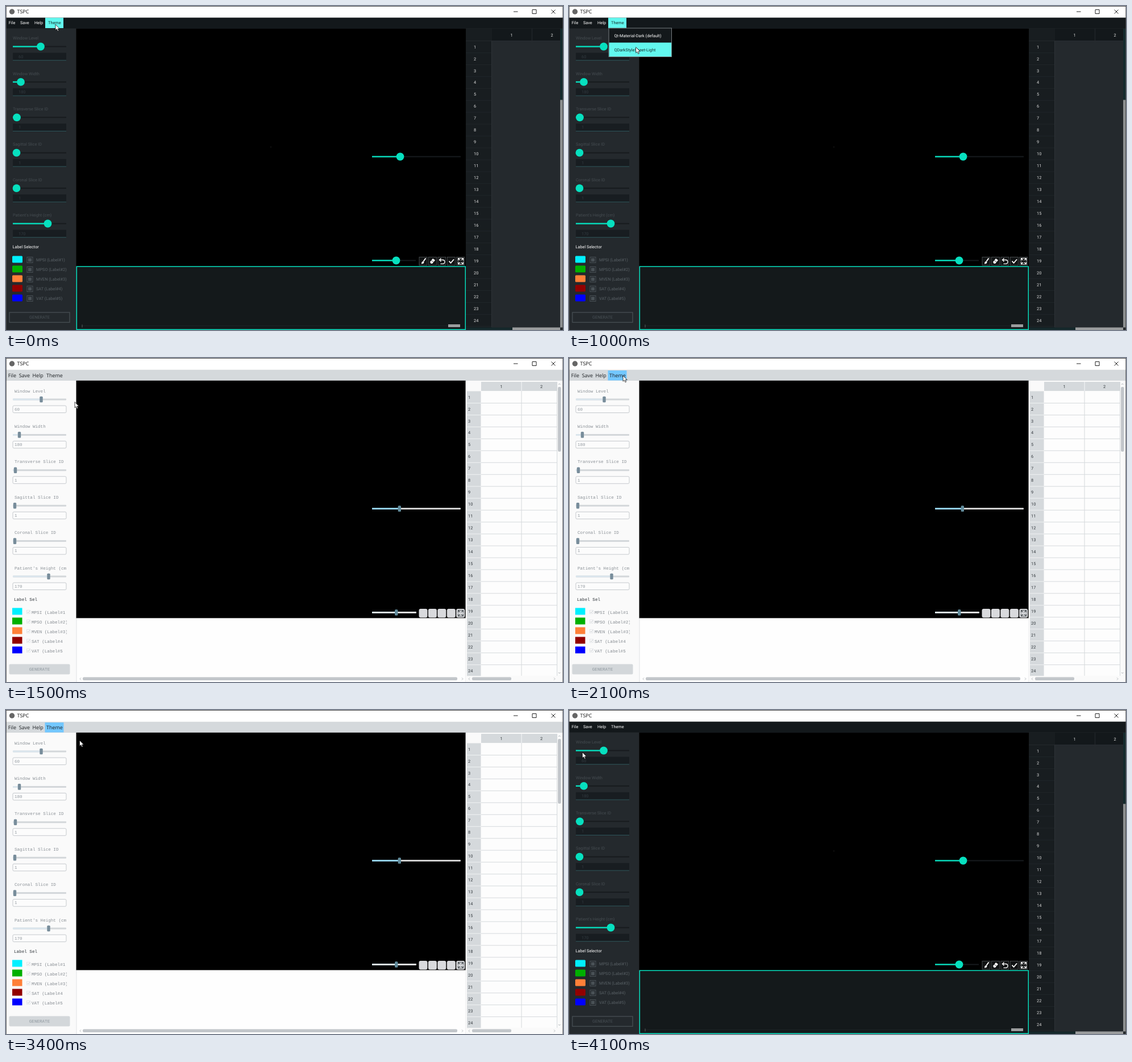
Write an HTML page that moves like this. It is 980 px wide and 571 px high and loops after 4.2 s.

```html
<!DOCTYPE html>
<html lang="en">
<head>
<meta charset="utf-8">
<title>Theme switch</title>
<style>
  html, body { margin: 0; width: 100%; height: 100%; overflow: hidden; background: #000; }
  svg { display: block; width: 980px; height: 571px; }
  text { white-space: pre; text-rendering: geometricPrecision; }
  .roboto { font: 7.35px Roboto, sans-serif; }
  .ui { font: 8.95px "Open Sans", sans-serif; }
  .mono { font: 7.6px "Liberation Mono", monospace; }
</style>
</head>
<body>
<svg id="stage" viewBox="0 0 980 571"></svg>
<script>
const LOOP = 4200, STEP = 100;
const TEAL = '#07e0bf', CYAN = '#62f7ee', BLUE = '#73c7ff';
const BAR = '#13181b', PANEL = '#24292d', SILVER = '#d5d9dc', HANDLE = '#c2c6ca';

const rect = (x, y, w, h, fill, extra = '') =>
  `<rect x="${x}" y="${y}" width="${w}" height="${h}" fill="${fill}" ${extra}/>`;
const text = (x, y, str, fill, font = 'roboto', extra = '') =>
  `<text x="${x}" y="${y}" fill="${fill}" class="${font}" ${extra}>${str}</text>`;
const path = (d, stroke, width = 1, fill = 'none') =>
  `<path d="${d}" stroke="${stroke}" stroke-width="${width}" fill="${fill}"/>`;
const circle = (x, y, r, fill) => `<circle cx="${x}" cy="${y}" r="${r}" fill="${fill}"/>`;
const group = (id, body) => `<g id="${id}">${body}</g>`;
const range = (n, draw) => Array.from({ length: n }, (_, i) => draw(i)).join('');
const MIDDLE = 'text-anchor="middle"';

const ROW = 62.4;
const fields = [
  { label: 'Window Level', value: 60, dark: 61, light: 62 },
  { label: 'Window Width', value: 180, dark: 26, light: 23.5 },
  { label: 'Transverse Slice ID', value: 1, dark: 19, light: 16.5 },
  { label: 'Sagittal Slice ID', value: 1, dark: 18.5, light: 15.5 },
  { label: 'Coronal Slice ID', value: 1, dark: 18.5, light: 15.5 },
  { label: "Patient's Height (cm)", value: 170, dark: 73.5, light: 75 },
];
const labels = [
  ['MPSI', '#00f0ff'], ['MPSO', '#00b000'], ['MVEN', '#ff8038'], ['SAT', '#920000'], ['VAT', '#0000ff'],
];
const menus = ['File', 'Save', 'Help', 'Theme'];
const toolX = [727, 743.4, 759.8, 776.3, 792.7];

const expandIcon = color => path(
  'M795.5 449v-4.500h4.500M800 444.500h4.500v4.500M804.500 450.500v4.500h-4.500M800 455h-4.500v-4.500' +
  'M796 445l3 3M804 445l-3 3M804 454.500l-3-3M796 454.500l3-3', color, 1.2);

function titleBar() {
  return rect(0, 0, 980, 20.5, '#fff') + rect(0, 0, 980, 1, '#4b4b4b') +
    circle(10.5, 10, 4.7, '#666') + text(19.5, 13.4, 'TSPC', '#111', 'ui') +
    path('M893 10h7.500M926 6.500h7v7h-7zM959.500 6.500l7 7M966.500 6.500l-7 7', '#222');
}

function darkSlider(x1, x2, y, knob) {
  return rect(x1, y - 1, x2 - x1, 2, '#171b1e') + rect(x1, y - 1.2, knob - x1, 2.4, TEAL) +
    circle(knob, y, 6.9, TEAL);
}

function darkSidebar() {
  const inputs = fields.map(({ label, value, dark }, i) => {
    const y = i * ROW;
    return text(12, 59.2 + y, label, '#454c51') + darkSlider(12, 106, 71.5 + y, dark) +
      rect(12, 82.5 + y, 94, 13, '#181d21') + rect(12, 95.2 + y, 94, 1, '#2d555a') +
      text(22, 91.6 + y, value, '#333b40');
  }).join('');
  const legend = labels.map(([name, color], i) => {
    const y = i * 17;
    return rect(11, 440.5 + y, 18, 12, color, 'rx="1.5"') +
      rect(37, 442.5 + y, 10, 10, 'none', 'stroke="#495156"') + rect(39, 444.500 + y, 6, 6, '#495156') +
      text(53, 450.2 + y, `${name} (Label#${i + 1})`, '#596166');
  }).join('');
  return inputs + text(11.5, 427, 'Label Selector', '#fff') + legend +
    rect(6, 540, 106, 17.5, 'none', 'stroke="#474f54" stroke-width="1.3"') +
    text(59, 551, 'GENERATE', '#495156', 'roboto', MIDDLE);
}

function darkTools() {
  const boxes = toolX.map(x => rect(x, 442.500, 14, 14.500, '#101213', 'stroke="#53575a" stroke-width=".8"')).join('');
  return boxes +
    path('M738.500 444.500l-4 5.500', '#fff', 2) + path('M734 450q-3 0-3 4.500q4.500 0 4.500-3.500z', 'none', 0, '#fff') +
    path('M746 451l5-6 4 3-5 6h-2.500z', 'none', 0, '#fff') + path('M748.300 448.300l4 3.200', '#101213', .8) +
    path('M763 447.500h5.500a3.400 3.400 0 0 1 0 6.800h-4M765.500 444.500l-3 3 3 3', '#fff', 1.3) +
    path('M779.500 449.700l3 3.300 5.500-6.500', '#fff', 1.8) + expandIcon('#fff');
}

function darkTable() {
  return rect(809, 40, 45.500, 531, '#181d20') + rect(854.500, 40, 120.500, 21, BAR) +
    rect(854, 61, 1, 505, '#2d3236') + rect(925, 40, 1, 21, PANEL) + rect(809, 61, 166, .7, '#2a2f33') +
    text(889.500, 53.500, 1, '#dcdcdc', 'roboto', MIDDLE) + text(960.500, 53.500, 2, '#dcdcdc', 'roboto', MIDDLE) +
    range(24, i => text(823, 74.6 + i * 20.96, i + 1, '#dcdcdc') +
      rect(809, 82 + i * 20.96, 45, .7, '#23292d')) +
    rect(975, 40, 5, 126, '#142a2d') + rect(975, 165.500, 4.500, 401, '#8d9091') +
    rect(809, 566.500, 82, 4.500, '#15282b') + rect(891, 566.500, 84, 4.500, '#9a9c9d');
}

function darkTheme() {
  return rect(0, 20, 980, 551, PANEL) + rect(0, 20, 980, 19.5, BAR) + darkSidebar() +
    rect(123.5, 39.8, 685.5, 419, '#000') + rect(465.500, 248, 1, 1, '#444') +
    rect(124.3, 459.2, 684, 111, '#14191b', `stroke="${TEAL}" stroke-width="1.5"`) +
    rect(134, 563, 665, 1, '#1b2225') + rect(133.500, 561.500, 1, 5, '#59605f') + rect(778, 561, 21, 5, '#9b9d9e') +
    darkSlider(644, 800, 265.500, 693.500) + darkSlider(644, 721, 448.500, 686.500) + darkTools() + darkTable() +
    group('darkHover', rect(69, 20.500, 32, 18.500, CYAN)) +
    menus.map((name, i) => text([4.8, 25, 50, 74][i], 32.1, name, '#fff', 'roboto', `id="dark${name}"`)).join('') +
    group('darkMenu', rect(70, 39, 110.500, 50.500, BAR, 'stroke="#777d80"') +
      rect(70.500, 40, 109.500, 24.500, CYAN, 'id="darkItem0"') + rect(70.500, 64.500, 109.500, 24.500, CYAN, 'id="darkItem1"') +
      text(79.500, 54.500, 'Qt-Material-Dark (default)', '#fff', 'roboto', 'id="darkText0"') +
      text(79.500, 79.500, 'QDarkStyleSheet-Light', '#fff', 'roboto', 'id="darkText1"'));
}

function lightSlider(x1, x2, y, knob, fill, rest, handle) {
  return rect(x1, y - 1.500, x2 - x1, 3, rest, 'rx="1"') + rect(x1, y - 1.500, knob - x1, 3, fill, 'rx="1"') +
    rect(knob - 2.700, y - 5.300, 5.400, 10.600, handle, 'rx="1.5"');
}

function lightSidebar() {
  const inputs = fields.map(({ label, value, light }, i) => {
    const y = i * ROW;
    return text(15, 60.5 + y, label.slice(0, 20), '#8d9399', 'mono') +
      lightSlider(12, 106, 73 + y, light, '#dbe6ed', '#d3d7da', '#788d9b') +
      rect(12, 84 + y, 94, 12.5, '#fcfcfc', 'rx="2" stroke="#c5c9cd"') +
      text(15, 92.8 + y, value, '#969da3', 'mono');
  }).join('');
  const legend = labels.map(([name, color], i) => {
    const y = i * 17;
    return rect(11, 440.500 + y, 17.500, 12, color) +
      rect(36.500, 444.500 + y, 6, 6, '#fafafa', 'stroke="#e0e3e6" stroke-width=".8"') +
      path(`M37.500 ${447.500 + y}l1.500 1.500 3-3.500`, '#bfc5ca', .8) +
      text(45, 450.6 + y, `${name} (Label#${i + 1}${i === 1 || i === 2 ? ')' : ''}`, '#858b91', 'mono');
  }).join('');
  return inputs + text(14, 427.5, 'Label Sel', '#30363b', 'mono') + legend + rect(107, 440, 10, 90, '#fafafa') +
    rect(5.500, 539.500, 107, 18, '#d3d7da', 'rx="2"') + text(59, 551.2, 'GENERATE', '#8f989f', 'mono', MIDDLE);
}

function lightTable() {
  return rect(809, 40, 171, 531, '#fafafa') + rect(836, 42, 134, 16, SILVER) + rect(811, 58.500, 24.500, 502, SILVER) +
    rect(836, 58.500, 134, 502, '#fdfdfd') +
    text(871.500, 52.700, 1, '#30363b', 'roboto', MIDDLE) + text(942, 52.700, 2, '#30363b', 'roboto', MIDDLE) +
    range(24, i => text(813, 71.6 + i * 20.96, i + 1, '#30363b') +
      rect(836, 79 + i * 20.96, 134, 1, SILVER) + rect(811, 79 + i * 20.96, 24.500, 1, '#f0f2f3')) +
    rect(906.500, 58, 1, 502, SILVER) + rect(906.500, 42, 1, 16, '#f6f7f8') + rect(969, 42, 1, 518, SILVER) +
    rect(809, 560.500, 171, 10.500, '#fafafa') +
    rect(971, 51, 5.500, 114, HANDLE, 'rx="2"') + rect(820, 562.500, 69, 5.500, HANDLE, 'rx="2"') +
    path('M972 47l1.700-2 1.700 2M972 554l1.700 2 1.700-2M816 563.500l-2 2 2 2M964 563.500l2 2-2 2', '#b4b9bd');
}

function lightTheme() {
  const tools = toolX.map(x => rect(x - .500, 442, 15, 15.500, '#d9dadd', 'rx="3"')).join('');
  return rect(0, 20, 980, 551, '#fafafa') + rect(0, 20.500, 980, 19.500, SILVER) + lightSidebar() +
    rect(123.500, 39.800, 685.500, 419, '#000') + rect(124, 458.500, 685, 112.500, '#fefefe') +
    rect(123.500, 458.500, 1, 112.500, '#dfe2e4') + rect(808.500, 40, 1, 531, '#dfe2e4') +
    rect(135, 562.500, 659, 5.500, HANDLE, 'rx="2"') + path('M132 563.500l-2 2 2 2M802 563.500l2 2-2 2', '#b4b9bd') +
    lightSlider(644, 800, 265.500, 692.300, '#91cde9', '#cfcfcf', '#628c9c') +
    lightSlider(644, 722, 448.500, 686.700, '#d9ebf2', '#e2e4e5', '#628c9c') +
    tools + expandIcon('#53595d') + lightTable() +
    group('lightHover', rect(68.500, 22, 33, 17.500, BLUE)) +
    menus.map((name, i) => text([3.8, 22.7, 46.5, 71][i], 33.8, name, '#1b1f22', 'ui')).join('') +
    group('lightMenu', rect(69, 39.500, 147.500, 30.500, SILVER) +
      rect(69, 39.500, 147.500, 15, BLUE, 'id="lightItem0"') +
      text(71.8, 49.5, 'Qt-Material-Dark (default)', '#1b1f22', 'ui') +
      text(71.8, 65.2, 'QDarkStyleSheet-Light (default)', '#1b1f22', 'ui'));
}

document.getElementById('stage').innerHTML =
  group('dark', darkTheme()) + group('light', lightTheme()) + titleBar() +
  rect(0, 0, .8, 571, '#4b4b4b') + rect(979.300, 0, .7, 571, '#4b4b4b') +
  group('cursor', path('M0 0v10.200l2.300-2.100 1.700 3.700 1.700-.800-1.600-3.500h3.200z', '#000', .7, '#fff'));

// Pointer path: time, x, y
const pointer = [
  [0, 87, 32.5], [100, 91, 32], [200, 91, 32], [300, 94, 33], [400, 94, 33.5], [700, 116, 70], [900, 116, 70],
  [1200, 121, 77.5], [1500, 121, 77.5], [2000, 94, 30], [2300, 97, 33], [2500, 97.5, 33.5],
  [2700, 119, 47], [2800, 119, 47], [3000, 129, 49], [3100, 129, 49], [3200, 129.5, 53.5],
  [3500, 129.5, 53.5], [3700, 140, 63], [4100, 23.5, 74.5], [4200, 23.5, 74.5],
];

function pointerAt(t) {
  const next = Math.max(1, pointer.findIndex(key => key[0] > t));
  const [t0, x0, y0] = pointer[next - 1], [t1, x1, y1] = pointer[next];
  const k = (t - t0) / (t1 - t0);
  return [x0 + (x1 - x0) * k, y0 + (y1 - y0) * k];
}

const byId = id => document.getElementById(id);
const show = (id, on) => byId(id).setAttribute('display', on ? 'inline' : 'none');
const between = (t, from, to) => t >= from && t < to;

function draw(t) {
  const [x, y] = pointerAt(t);
  const light = between(t, 1500, 3500);
  const darkHover = t < 1500;
  show('dark', !light);
  show('light', light);
  show('darkHover', darkHover);
  byId('darkTheme').setAttribute('fill', darkHover ? '#14302f' : '#fff');
  show('darkMenu', between(t, 300, 1300));
  [between(y, 40, 64.5), between(y, 64.5, 89)].forEach((over, i) => {
    show('darkItem' + i, over);
    byId('darkText' + i).setAttribute('fill', over ? '#14302f' : '#fff');
  });
  show('lightHover', between(t, 1900, 3500));
  show('lightMenu', between(t, 2300, 3300));
  show('lightItem0', between(y, 39.5, 55));
  byId('cursor').setAttribute('transform', `translate(${x} ${y})`);
}

function frame() {
  draw(Math.floor(performance.now() % LOOP / STEP) * STEP);
  requestAnimationFrame(frame);
}
frame();
</script>
</body>
</html>
```
